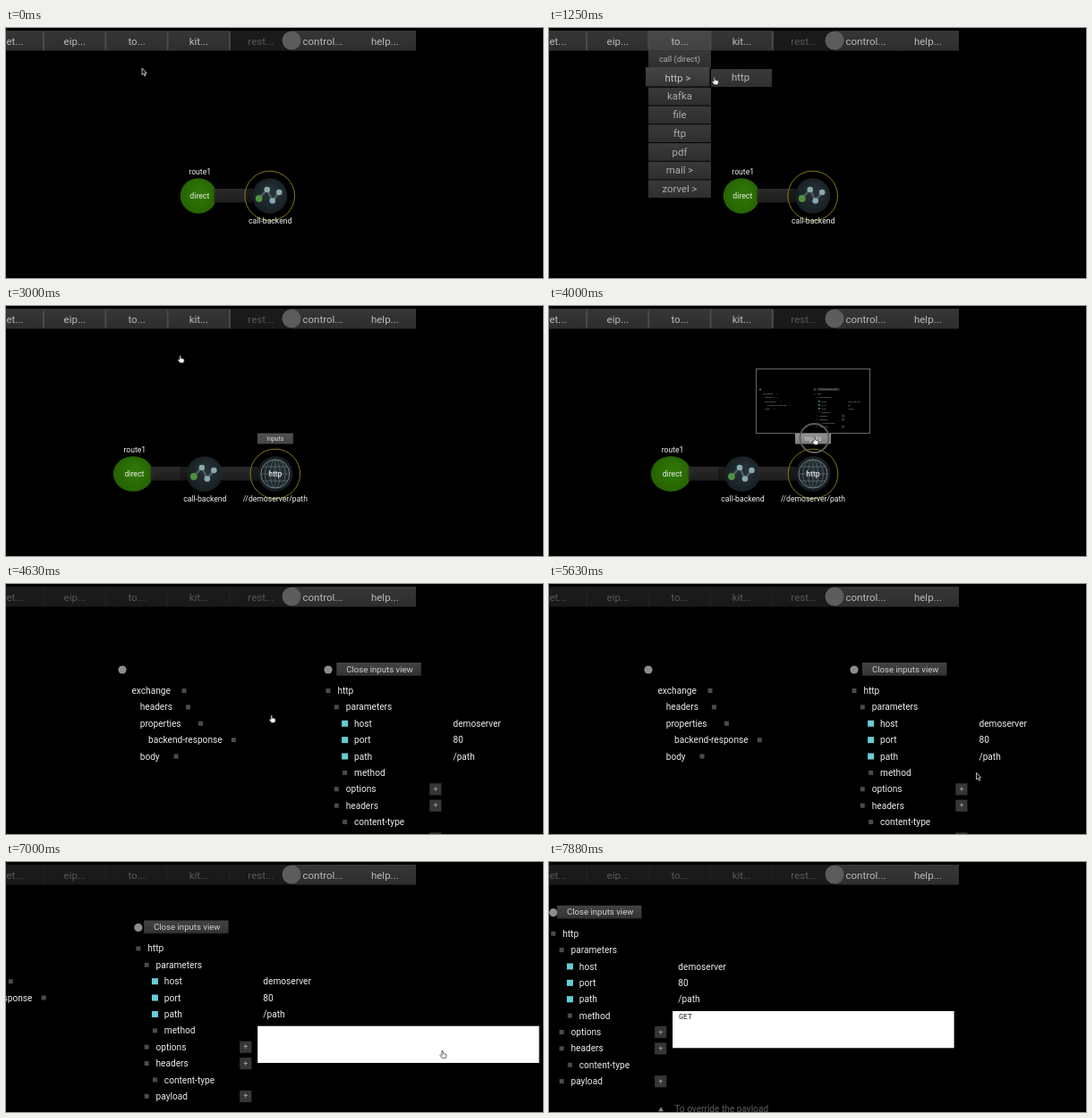
Recreate the animation shown at these times as an HTML page with a canvas. Size 600x280 px, loop 8000 ms.

```html
<!DOCTYPE html>
<html lang="en">
<head>
<meta charset="utf-8">
<title>Route editor</title>
<style>
html, body { margin: 0; width: 100%; height: 100%; overflow: hidden; background: #000; }
canvas { display: block; width: 600px; height: 280px; }
</style>
</head>
<body>
<canvas id="stage" width="600" height="280"></canvas>
<script>
const ctx = document.getElementById('stage').getContext('2d');
const LOOP = 8000, STEP = 125;
const SANS = 'Roboto, sans-serif', MONO = '"Liberation Mono", monospace';
const ZOOM = { x: 274.2, y: 92.8, sx: 0.265, sy: 0.22 };

const clamp = v => Math.max(0, Math.min(1, v));
const mix = (a, b, p) => a + (b - a) * p;
const ease = p => p < 0.5 ? 2 * p * p : 1 - 2 * (1 - p) * (1 - p);
const tween = (t, start, length) => ease(clamp((t - start) / length));
const gray = v => `rgb(${[v, v, v].map(Math.round)})`;

function text(str, x, y, size, color, align = 'left', font = SANS) {
  ctx.font = `${size}px ${font}`;
  ctx.textAlign = align;
  ctx.fillStyle = color;
  ctx.fillText(str, x, y + size * 0.35);
}

function box(x, y, w, h, color) {
  ctx.fillStyle = color;
  ctx.fillRect(x, y, w, h);
}

// Horizontal slab with soft vertical shading
function slab(x, y, w, h, top, bottom) {
  const g = ctx.createLinearGradient(0, y, 0, y + h);
  g.addColorStop(0, top);
  g.addColorStop(1, bottom);
  box(x, y, w, h, g);
}

function oval(x, y, rx, ry = rx) {
  ctx.beginPath();
  ctx.ellipse(x, y, rx, ry, 0, 0, Math.PI * 2);
}

function disc(x, y, r, color) {
  oval(x, y, r);
  ctx.fillStyle = color;
  ctx.fill();
}

function ring(x, y, r, color, width) {
  oval(x, y, r);
  ctx.strokeStyle = color;
  ctx.lineWidth = width;
  ctx.stroke();
}

const ballWidth = x => 19.5 + 3 * ((x - 300) / 163) ** 2;

function ball(x, y, inner, outer) {
  const g = ctx.createRadialGradient(x + 3, y - 4, 4, x, y, 24);
  g.addColorStop(0, inner);
  g.addColorStop(1, outer);
  oval(x, y, ballWidth(x), 19.8);
  ctx.fillStyle = g;
  ctx.fill();
}

function menuBar(t) {
  const dim = tween(t, 4050, 500);
  const open = t >= 250 && t < 2750;
  ['set...', 'eip...', 'to...', 'kit...', 'rest...', 'control...', 'help...'].forEach((name, i) => {
    const left = 42.5 + (i - 1) * 69.3;
    const fade = i === 4 ? 1 : i < 4 ? dim : 0;
    const lift = open && i === 2 ? 20 : 0;
    slab(left, 3, i < 6 ? 69.8 : 69, 22.5, gray(mix(54, 27, fade) + lift), gray(mix(46, 25, fade) + lift));
    if (i > 0 && i < 5) box(left - 1.5, 4, 2, 20.5, gray(mix(74, 31, i === 4 ? dim : fade)));
    text(name, i ? left + 34.3 : 7, 14.5, 11.5, gray(mix(186, 88, fade)), 'center');
  });
  disc(319, 14, 10.5, '#5c5c5c');
}

function dropdown(t) {
  if (t < 250 || t >= 2750) return;
  const items = ['call (direct)', 'http >', 'kafka', 'file', 'ftp', 'pdf', 'mail >', 'zorvel >'];
  const hover = t >= 875 ? 1 : t >= 750 ? 0 : -1;
  items.forEach((name, i) => {
    const on = i === hover, y = 25.2 + i * 20.75;
    const x = on ? 108 : 111;
    slab(x, on ? y - 2 : y, on ? 71.5 : 70, on ? 21.5 : 19.8, on ? '#454545' : '#393939', on ? '#353535' : '#2e2e2e');
    text(name, on ? 144 : 146, y + 9.8, i ? 11.4 : 9.2, on ? '#c0c0c0' : '#adadad', 'center');
  });
  if (t >= 1000 && t < 2125) {
    const on = t >= 1500;
    slab(on ? 178 : 181, on ? 43 : 46, on ? 71 : 68, on ? 22 : 20, on ? '#454545' : '#393939', '#303030');
    text('http', 214, 55, 11.4, '#b8b8b8', 'center');
  }
}

function link(from, to) {
  const start = from + ballWidth(from) - 3;
  slab(start, 180, to - start - 19, 15.5, 'rgba(46,46,46,.9)', 'rgba(32,32,32,.9)');
  box(to - 27, 180, 8, 15.5, 'rgba(0,0,0,.3)');
}

function chain(x, y) {
  const dots = [[-12, 3], [-3, -7], [3, 5.5], [10.5, -4]];
  ctx.beginPath();
  dots.forEach(([dx, dy]) => ctx.lineTo(x + dx, y + dy));
  ctx.strokeStyle = '#4c5e63';
  ctx.lineWidth = 2.4;
  ctx.stroke();
  dots.forEach(([dx, dy], i) => disc(x + dx, y + dy, i ? 3.3 : 3.9, i ? '#8aa9ae' : '#4f9140'));
}

function globe(x, y) {
  ctx.save();
  ring(x, y, 16, '#7b888c', 0.9);
  oval(x, y, 16);
  ctx.clip();
  ctx.lineWidth = 0.7;
  ctx.strokeStyle = '#647277';
  for (const rx of [5.5, 11.5]) {
    oval(x, y, rx, 16);
    ctx.stroke();
  }
  ctx.beginPath();
  ctx.moveTo(x, y - 16);
  ctx.lineTo(x, y + 16);
  for (const dy of [-8, 0, 8]) {
    ctx.moveTo(x - 16, y + dy);
    ctx.lineTo(x + 16, y + dy);
  }
  ctx.stroke();
  ctx.restore();
}

function route(t) {
  const pan = -78.7 * tween(t, 2192, 1000);
  const a = 215 + pan, b = 294.7 + pan, c = 373.7 + pan, y = 188;
  const added = t >= 2375;
  ball(a, y, '#2f7606', '#256000');
  link(a, b);
  ball(b, y, '#263136', '#141b1e');
  chain(b, y);
  text('direct', a + 1.3, y, 8.7, '#e4efe0', 'center');
  text('route1', a + 1.7, 160.5, 8.6, '#f0f0f0', 'center');
  if (added) {
    link(b, c);
    ball(c, y, '#252f33', '#11181b');
    globe(c, y);
    text('http', c, y, 8.7, '#fff', 'center');
    const hot = t >= 3500;
    slab(c - 20, 142.5, 40, 12, hot ? '#939393' : '#525252', hot ? '#7d7d7d' : '#454545');
    text('Inputs', c, 148.5, 6.8, '#dcdcdc', 'center');
  }
  ring(added ? c : b, y, 27.8, '#8e871f', 0.9);
  text('call-backend', b + 0.5, 216, 8.65, '#f0f0f0', 'center');
  if (added) text('//demoserver/path', c, 216, 8.6, '#f0f0f0', 'center');
}

const rowY = i => 119.5 + i * 18.38;
const mark = (x, y) => box(x - 2.5, y - 2.5, 5, 5, '#4b4b4b');

function tree(t) {
  const far = tween(t, 6472, 980);
  const dx = mix(19, 0, tween(t, 4650, 850)) - 336.2 * far, dy = -39.3 * far;
  ctx.save();
  ctx.translate(dx, dy);

  disc(111, 96, 4.6, '#8c8c8c');
  [['exchange', 121.5, 180], ['headers', 130.7, 184.5], ['properties', 130.7, 198.5],
   ['backend-response', 140, 235.3], ['body', 130.7, 171]].forEach(([name, x, end], i) => {
    text(name, x, rowY(i), 10.15, '#ececec');
    mark(end, rowY(i));
  });

  disc(341, 96, 4.6, '#8c8c8c');
  const shift = dx * 0.0145;
  slab(350 + shift, 88, 94.5, 14.5, '#424242', '#343434');
  box(350 + shift, 102, 94.5, 1, '#222');
  text('Close inputs view', 361 + shift, 95.2, 9.6, '#cfcfcf');

  const values = { host: 'demoserver', port: '80', path: '/path' };
  [['http', 0], ['parameters', 1], ['host', 2], ['port', 2], ['path', 2], ['method', 2],
   ['options', 1], ['headers', 1], ['content-type', 2], ['payload', 1]].forEach(([name, depth], i) => {
    const x = 341 + depth * 9.3, y = rowY(i);
    if (values[name]) {
      box(x - 3.5, y - 3.5, 7, 7, '#66ced5');
      text(values[name], 480.5, y, 10.15, '#ececec');
    } else {
      mark(x, y);
    }
    text(name, x + 10.4, y, 10.15, '#ececec');
    if (depth === 1 && i > 1) {
      box(454.3, y - 6.5, 13.2, 13.2, '#363636');
      text('+', 461, y, 9, '#aaa', 'center');
    }
  });

  ctx.beginPath();
  ctx.moveTo(458.5, 318.5);
  ctx.lineTo(461.3, 313.5);
  ctx.lineTo(464, 318.5);
  ctx.fillStyle = '#8a8a8a';
  ctx.fill();
  text('To override the payload', 476.5, 316, 10.15, '#5c5c5c');

  if (t >= 6125) {
    box(474.3, 206.3, 314.5, t >= 6500 ? 41.3 : 20.7, '#fff');
    const typed = 'GET'.slice(0, clamp((t - 7375) / 375) * 3);
    text(typed, 481.3, 212.3, 8.3, '#222', 'left', MONO);
  }
  ctx.restore();
}

function scene(t) {
  const k = tween(t, 4050, 550);
  if (k >= 1) return tree(t);
  ctx.save();
  ctx.translate(ZOOM.x, ZOOM.y);
  ctx.scale(ZOOM.sx ** -k, ZOOM.sy ** -k);
  ctx.translate(-ZOOM.x, -ZOOM.y);
  route(t);
  if (t >= 3500) {
    box(231.5, 70.5, 127, 72, '#000');
    ctx.save();
    ctx.beginPath();
    ctx.rect(231.5, 70.5, 127, 72);
    ctx.clip();
    ctx.translate(ZOOM.x, ZOOM.y);
    ctx.scale(ZOOM.sx, ZOOM.sy);
    ctx.translate(-ZOOM.x, -ZOOM.y);
    ctx.globalAlpha = mix(0.75, 1, k);
    tree(t);
    ctx.restore();
    ctx.strokeStyle = `rgba(104,104,104,${1 - k})`;
    ctx.lineWidth = 1;
    ctx.strokeRect(231.5, 70.5, 127, 72);
  }
  ctx.restore();
}

const PATH = [
  [0, 152, 45], [375, 150, 17], [500, 150, 17], [1000, 150, 54], [1375, 194, 55.5],
  [3000, 194, 55.5], [3500, 296, 147], [4625, 296, 147], [5500, 477.5, 211.5],
  [5625, 477.5, 211.5], [6000, 487, 211.5], [LOOP, 487, 211.5]
];

function pointer(t) {
  if (t >= 7500) return;
  const i = PATH.findIndex(p => p[0] > t);
  const [t0, x0, y0] = PATH[i - 1], [t1, x1, y1] = PATH[i];
  const p = ease((t - t0) / (t1 - t0));
  if (t >= 3875 && t < 4125) ring(296.5, 148, t < 4000 ? 9 : 16, '#5e5e5e', 1.8);
  const hand = (t >= 250 && t < 4750) || t >= 5750;
  const shape = hand
    ? [[0, 0], [1.2, 0], [1.4, 3], [5, 4], [5, 6.5], [4, 8.3], [0.5, 8.3], [-2, 5], [-1, 4], [0, 5]]
    : [[0, 0], [0, 7.5], [1.8, 6], [3, 8.8], [4.2, 8.2], [3, 5.6], [5.2, 5.4]];
  ctx.save();
  ctx.translate(mix(x0, x1, p), mix(y0, y1, p));
  ctx.beginPath();
  shape.forEach(([x, y]) => ctx.lineTo(x, y));
  ctx.closePath();
  ctx.fillStyle = hand ? '#fff' : '#111';
  ctx.strokeStyle = hand ? '#444' : '#ddd';
  ctx.lineWidth = 0.8;
  ctx.fill();
  ctx.stroke();
  ctx.restore();
}

function draw(now) {
  // The picture advances eight times a second
  const t = Math.floor((now % LOOP) / STEP) * STEP;
  box(0, 0, 600, 280, '#000');
  scene(t);
  menuBar(t);
  dropdown(t);
  pointer(t);
}

let start;
function tick(now) {
  start ??= now;
  draw(now - start);
  requestAnimationFrame(tick);
}
draw(0);
requestAnimationFrame(tick);
</script>
</body>
</html>
```
